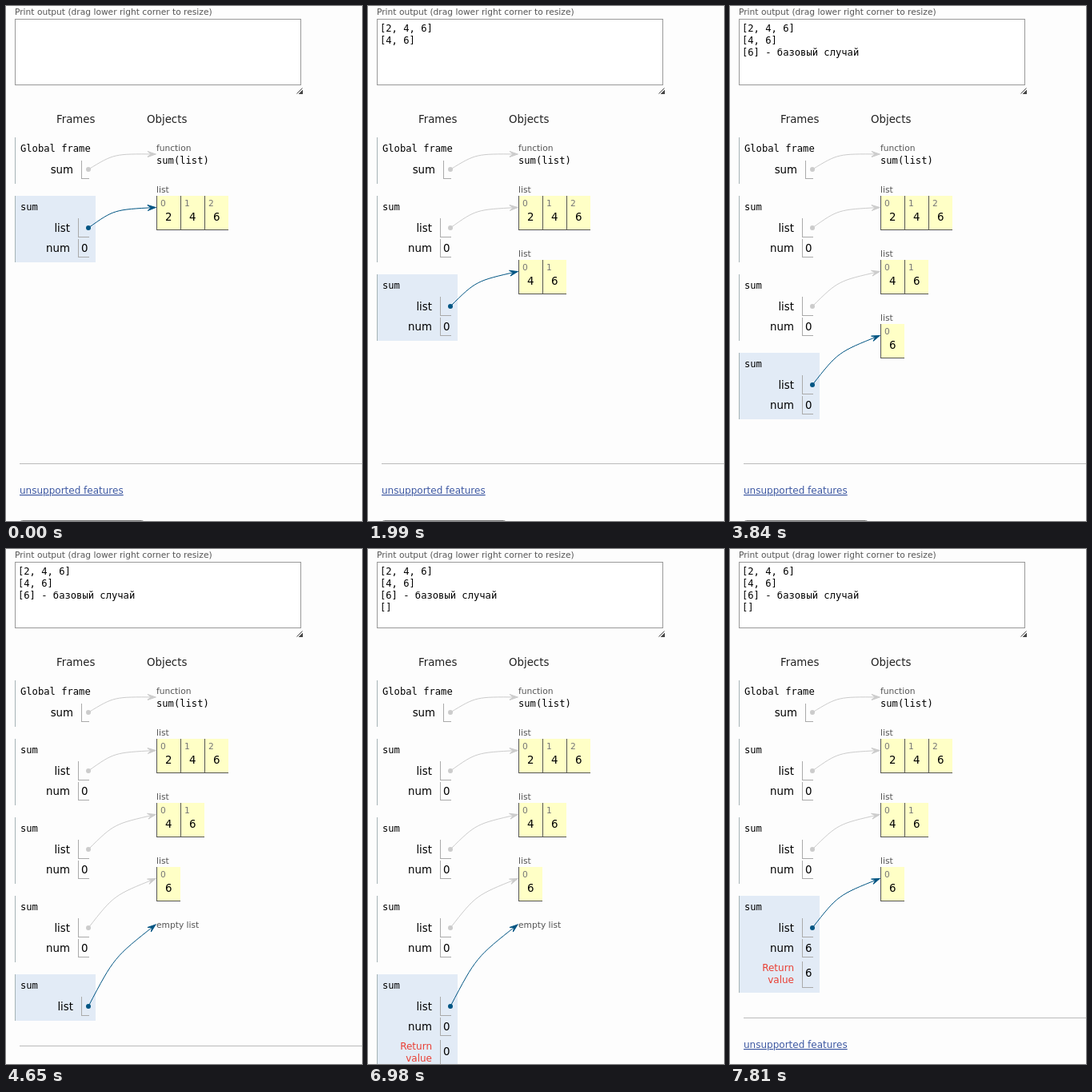
These frames come from a looping animation (445 px wide and 643 px high, 8000 ms). An HTML page:

```html
<!DOCTYPE html>
<html lang="en">
<head>
<meta charset="utf-8">
<title>Recursive sum, step by step</title>
<style>
  html, body { margin: 0; width: 100%; height: 100%; overflow: hidden; background: #fdfdfd; }
  svg { display: block; width: 445px; height: 643px; }
  text { font: 13.33px "DejaVu Sans", sans-serif; fill: #000; white-space: pre; }
  text.code { font: 12.15px "DejaVu Sans Mono", monospace; }
  text.label { font-size: 10.67px; fill: #555; }
  text.index { font-size: 10.67px; fill: #777; }
  text.head { fill: #222; }
  text.return { font-size: 12px; fill: #e93f34; }
  text.link { font-size: 12px; fill: #3d58a2; text-decoration: underline; }
</style>
</head>
<body>
<svg id="stage" viewBox="0 0 445 643"></svg>
<script>
const LOOP = 8000;
const ACTIVE = '#005583', IDLE = '#ccc', EDGE = '#aaa';
const OUTPUT = ['[2, 4, 6]', '[4, 6]', '[6] - базовый случай', '[]'];
const LISTS = [[2, 4, 6], [4, 6], [6], []];

// [start ms, printed lines, call depth, num, return value] (the last two belong to the innermost call)
const STEPS = [
  [0, 0, 1, 0], [430, 1, 1, 0],
  [870, 1, 2], [1460, 1, 2, 0], [1990, 2, 2, 0],
  [2540, 2, 3], [3100, 2, 3, 0], [3840, 3, 3, 0],
  [4650, 3, 4], [5210, 3, 4, 0], [6010, 4, 4, 0], [6980, 4, 4, 0, 0],
  [7380, 4, 3, 6], [7810, 4, 3, 6, 6],
];

const text = (x, y, content, cls = '', anchor = 'start') =>
  `<text x="${x}" y="${y}" class="${cls}" text-anchor="${anchor}">${content}</text>`;
const rect = (x, y, w, h, fill) =>
  `<rect x="${x}" y="${y}" width="${w}" height="${h}" fill="${fill}"/>`;

// Left and bottom edges of a value box; the right side is always at x = 104
const valueBox = (x, top, bottom) =>
  rect(x, top, 1, bottom - top, EDGE) + rect(x, bottom - 1, 104 - x, 1, EDGE);

function arrow(y1, y2, color) {
  const x1 = 103, x2 = 187;
  const cx = (x1 + x2) / 2 - 10, cy = (y1 + y2) / 2 - 10;
  const angle = Math.atan2(y2 - cy, x2 - cx) * 180 / Math.PI;
  return `<path d="M${x1} ${y1}C${cx} ${cy} ${cx} ${cy} ${x2} ${y2}" fill="none" stroke="${color}"/>
    <circle cx="${x1}" cy="${y1}" r="3" fill="${color}"/>
    <path d="M0 0L-10 -3.5L-5.5 0L-10 3.5Z" fill="${color}" stroke="${color}"
      transform="translate(${x2} ${y2}) rotate(${angle})"/>`;
}

function callFrame(y, num, ret, active) {
  const hasNum = num !== undefined, hasRet = ret !== undefined;
  const height = hasRet ? 121 : hasNum ? 83 : 58;
  const x = hasNum ? 90 : 94;
  let s = active ? rect(11, y, 101, height, '#e2ebf6') : '';
  s += rect(11, y, 1, height, '#a6b3b6') + text(18, y + 18, 'sum', 'code');
  s += text(x - 10, y + 45, 'list', '', 'end') + valueBox(x, y + 28, y + 52);
  if (hasNum) {
    s += text(80, y + 70, 'num', '', 'end') + valueBox(90, y + 54, y + 77) + text(94, y + 70, num);
  }
  if (hasRet) {
    s += text(80, y + 94, 'Return', 'return', 'end') + text(80, y + 109, 'value', 'return', 'end');
    s += valueBox(90, y + 82, y + 115) + text(94, y + 101, ret);
  }
  return { svg: s, bottom: y + height };
}

function listObject(y, items) {
  if (!items.length) return text(188, y + 4, 'empty list', 'label');
  return text(188, y + 4, 'list', 'label') + items.map((value, i) => {
    const x = 188 + 30 * i;
    return rect(x, y + 8, 30, 43, '#ffffc6') + rect(x, y + 8, 1, 43, '#555') +
      rect(x, y + 50, 30, 1, '#555') + text(x + 5, y + 21, i, 'index') +
      text(x + 15.2, y + 39, value, '', 'middle');
  }).join('');
}

const header =
  text(11, 11, 'Print output (drag lower right corner to resize)', 'label') +
  '<rect x="11.5" y="16.5" width="357" height="82" fill="#fff" stroke="#999"/>' +
  '<path d="M363.5 109.5l7-7" stroke="#444"/><path d="M365.5 110l5.5-5.5v5.5z" fill="#444"/>' +
  text(63, 146, 'Frames', 'head') + text(176, 146, 'Objects', 'head') +
  rect(11, 164, 1, 58, '#a6b3b6') + text(18, 182, 'Global frame', 'code') +
  text(84, 209, 'sum', '', 'end') + valueBox(94, 193, 216) +
  text(188, 181, 'function', 'label') + text(188, 197, 'sum(list)', 'code') +
  arrow(204, 185, IDLE);

function render([, printed, depth, num, ret]) {
  let s = header, arrows = '', bottom = 0;
  OUTPUT.slice(0, printed).forEach((line, i) => s += text(15, 32 + 15 * i, line, 'code'));
  for (let i = 0; i < depth; i++) {
    const active = i === depth - 1;
    const y = 237 + 98 * i, objectY = 229 + 80 * i;
    const frame = active ? callFrame(y, num, ret, true) : callFrame(y, 0, undefined, false);
    bottom = frame.bottom;
    s += frame.svg + listObject(objectY, LISTS[i]);
    arrows += arrow(y + 40, objectY + (LISTS[i].length ? 22.5 : 0), active ? ACTIVE : IDLE);
  }
  const rule = Math.max(571, bottom + 31);
  return s + arrows + rect(17, rule, 428, 1, '#bbb') +
    text(17, rule + 38, 'unsupported features', 'link') +
    `<rect x="17.5" y="${rule + 71.5}" width="155" height="20" rx="3" fill="#efefef" stroke="#767676"/>`;
}

const stage = document.getElementById('stage');
let shown;
function tick() {
  const t = performance.now() % LOOP;
  const step = STEPS.findLast(([start]) => start <= t);
  if (step !== shown) stage.innerHTML = render(shown = step);
  requestAnimationFrame(tick);
}
tick();
</script>
</body>
</html>
```
